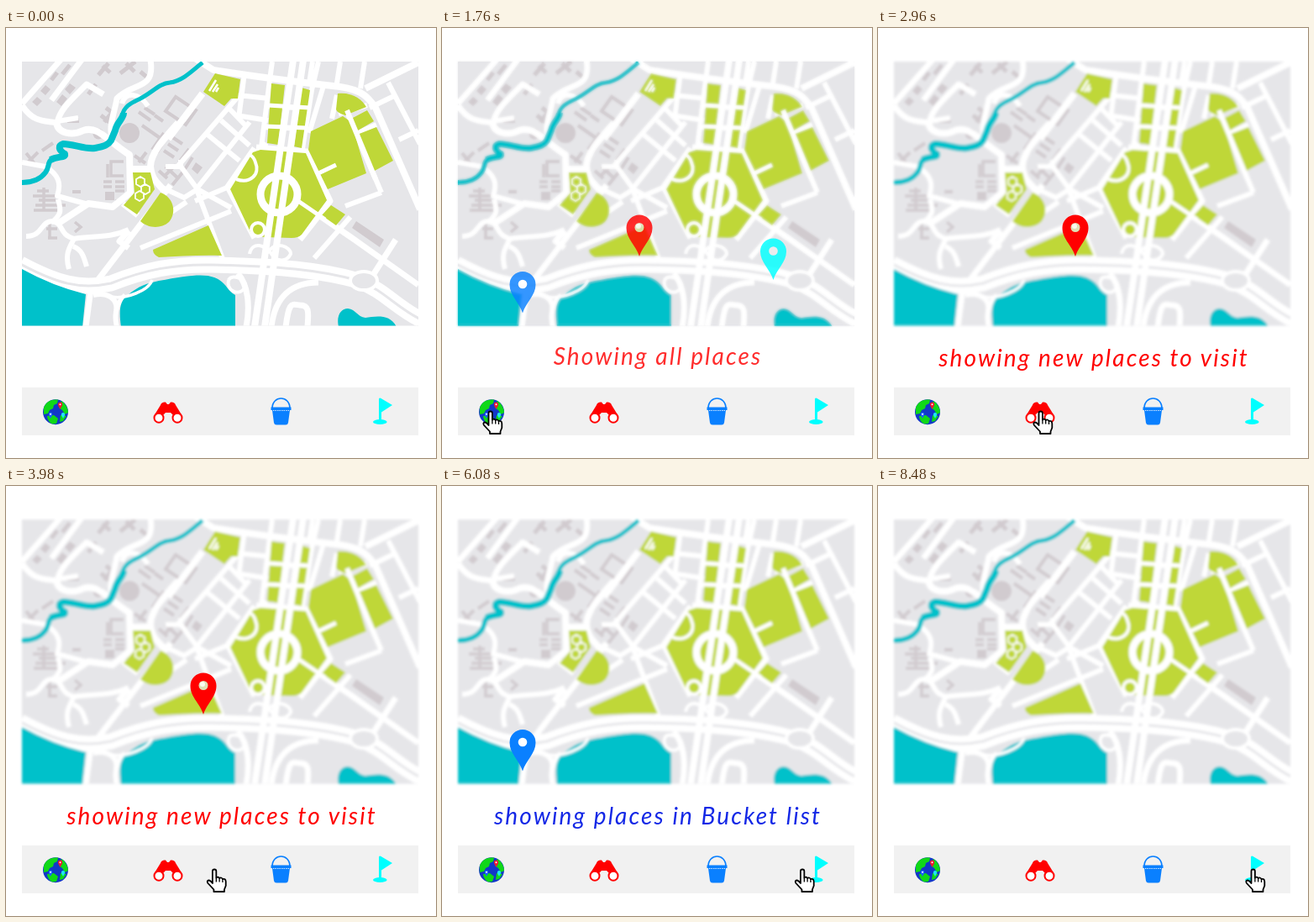
Animation of 512 by 512 pixels, one loop 9.14 s. Source, as an HTML page:

```html
<!DOCTYPE html>
<html lang="en">
<head>
<meta charset="utf-8">
<title>Places map</title>
<style>
  html, body { margin: 0; width: 100%; height: 100%; overflow: hidden; background: #fff; }
  svg { display: block; width: 100vw; height: 100vh; }
  text { font: italic 28px Lato, sans-serif; letter-spacing: 2.1px; text-anchor: middle; }
  .road { fill: none; stroke: #fff; stroke-linejoin: round; }
  .block { fill: none; stroke: #d1cbcf; }
</style>
</head>
<body>
<svg viewBox="0 0 512 512">
  <defs>
    <clipPath id="frame"><path d="M19 40H491V354.500H19z"/></clipPath>
    <filter id="soft" x="-5%" y="-5%" width="110%" height="110%"><feGaussianBlur stdDeviation="1.7"/></filter>
    <path id="pin" d="M0 0C-4-13-15.500-21-15.500-34A15.500 15.500 0 0 1 15.500-34C15.500-21 4-13 0 0z"/>
    <path id="highway" d="M17 281C60 304 88 312 125 304C165 288 200 281 245 282C320 283 376 288 420 301C450 312 466 334 494 347"/>

    <g id="map" clip-path="url(#frame)">
      <path fill="#e6e6e9" d="M19 40H491V356H19z"/>

      <!-- buildings -->
      <g fill="#d1cbcf">
        <circle cx="147" cy="125" r="12"/><circle cx="110" cy="126" r="6.500"/>
        <path d="M73 108h14v5H73zM118 195h11v10h-11zM79 193h10v4H79zM226 160l8 6-6 8-7-6zM417 230l33 22-5 9-33-23z"/>
        <path d="M47 68l6 5-6 7-6-5zM37 82l6 5-6 6-6-5zM76 66l7 5-7 8-6-6zM67 79l6 5-7 9-6-5z"/>
      </g>
      <g class="block">
        <path stroke-width="4" d="M202 82L226 98 214 115 190 99z"/>
        <path stroke-width="5" d="M54 62l7-9M67 55l9-11M110 56l12-14M115 45l9 8M136 54l18-14M143 42l10 10M160 52l7 6M98 79l9-12M117 112l12-15M113 104l10 8M119 95l9 7"/>
        <path stroke-width="4" d="M158 100l14 10M165 95l12 8M177 104l10 7M162 116l20 14M174 145l14-20M180 148l10-16M198 130l12 8M193 138l12 8M188 146l12 8M206 160l12-16M213 168l9-14"/>
        <path stroke-width="4" d="M153 152l13 9M158 160l9-12M24 149l12 15M24 162l14-14M43 146l13-9M190 165l16 15M188 177l14-14M198 187l13-16M182 170l10 9"/>
        <path stroke-width="3.500" d="M140 159h-15v17h15M121 162v16M116 183h10M116 189h10M130 183h11M130 189h11M130 194h11M130 206h11"/>
        <path stroke-width="3.500" d="M37 194h14M32 200h31M39 205h20M35 211h36M33 217h28M45 190v27M48 239h13M52 232v18M50 250h11M82 231l7 6-7 6"/>
      </g>

      <!-- streets -->
      <g class="road">
        <path stroke-width="8" d="M222 34L247 50C290 57 345 64 398 70C424 74 431 82 440 95L493 216M428 72L491 41"/>
        <path stroke-width="6" d="M455 65L493 138M468 133L491 122M433 95L464 80M372 40L364 74 352 150M398 40L393 72M427 40L422 72M365 40L361 66"/>
        <path stroke-width="6" d="M317 40L314 62 304 142M284 53L277 108M276 80L314 84M274 104L312 110M312 93L362 96M308 118L358 120M378 69L361 125"/>
        <path stroke-width="6" d="M394 80L388 108M396 102L430 92M406 100L447 196M412 128L441 115M447 196L404 212M410 225L367 274"/>
        <path stroke-width="7" d="M296 143L264 189 296 250M298 142L358 147 386 206 350 252M345 204L412 250 491 306M464 252L432 302"/>
        <path stroke-width="6" d="M276 82L205 164M290 112L228 190M310 137L268 190M264 94L286 117M256 110L290 140M240 127L278 158M228 192L268 214M268 188L225 206"/>
        <path stroke-width="8" d="M234 78L193 132M205 113C186 134 172 150 172 165C174 185 184 185 190 197M174 168H145"/>
        <path stroke-width="6" d="M190 165h18v-8M186 190L212 202 228 192 206 162M160 262L268 218M228 195L258 275M175 234L215 207"/>
        <path stroke-width="7" d="M95 356L101 311 196 187M146 241L135 254 146 262M157 223L139 209"/>
        <path stroke-width="7" d="M65 38L19 90M172 38C178 75 151 64 132 84C130 98 122 116 126 130M19 92C33 114 48 110 61 113C64 97 77 86 96 67L116 79M90 38L54 86"/>
        <path stroke-width="8" d="M60 110C60 127 80 128 92 122C110 116 120 134 147 151L148 196 127 213 98 209 60 234"/>
        <path stroke-width="6" d="M138 90C142 76 158 76 169 93M61 111L86 107M19 160L47 165C63 175 66 185 61 200L98 210M62 204C66 218 66 222 54 232"/>
        <path stroke-width="6" d="M24 248C45 248 40 230 56 230C70 234 62 245 81 251C101 247 123 251 146 240M81 251C75 262 70 270 75 287M80 260C91 264 93 274 96 284"/>
        <use href="#highway" stroke-width="19"/>
        <use href="#highway" stroke="#e6e6e9" stroke-width="3"/>
        <path stroke-width="6" d="M132 356C127 335 135 325 142 318M104 318C120 314 134 322 131 337"/>
        <path stroke-width="7" d="M286 356C291 330 288 306 276 292M316 356C320 320 340 303 372 303M333 356C337 325 340 329 350 330C362 330 360 340 359 356"/>
        <ellipse cx="426" cy="301" rx="16" ry="11" fill="#e6e6e9" stroke-width="4"/>
      </g>

      <!-- parks -->
      <g fill="#bfd738">
        <path d="M249 54L279 61 276 84H268L260 93 235 76z"/>
        <path d="M316 66L332 68 324 139 311 137zM352 71L362 74 352 143 343 141z"/>
        <path d="M395 78C412 76 424 85 429 94L404 104Q394 101 393 97z"/>
        <path d="M411 108L430 98 438 111 419 122zM418 127L441 118 461 158 437 171z"/>
        <path d="M363 123L401 105 411 112 429 173 383 192 360 145z"/>
        <path d="M303 145L357 149 382 205 352 246Q348 250 340 250L307 249 292 245 267 192 294 148z"/>
        <path d="M387 211L404 222 393 235 376 223z"/>
        <path d="M175 264L241 235 257 271C230 270 205 272 182 273Q175 270 175 264z"/>
        <path d="M151 172H172L177 192 156 222 140 211 153 196z"/>
        <path d="M184 196C199 201 204 219 194 231C184 240 168 238 160 230z"/>
      </g>

      <!-- water -->
      <g fill="#00c1ca">
        <path d="M19 287Q55 307 95 317L91 356H19z"/>
        <path d="M137 356C134 334 136 325 145 318C158 307 168 304 182 301C215 295 235 292 248 297C263 303 262 312 273 318V356z"/>
        <path d="M396 356C393 342 399 334 407 334C417 335 418 344 428 345C440 343 458 340 465 356z"/>
      </g>
      <g fill="none" stroke="#00c1ca" stroke-linejoin="round">
        <path stroke-width="6" d="M19 184C33 184 41 180 47 172C52 166 49 159 55 156"/>
        <path stroke-width="8" d="M53 157C62 152 71 155 70 150C62 145 62 140 68 138C80 138 95 145 106 143C117 141 122 139 125 134L130 122C132 112 140 108 140 101"/>
        <path stroke-width="5" d="M138 105C141 92 150 89 160 84C175 76 183 66 195 65C210 63 222 51 234 41"/>
      </g>

      <!-- roads across parks and water -->
      <g class="road">
        <path stroke-width="8" d="M342 38L296 356M354 38L308 356"/>
        <circle cx="325" cy="198" r="22" stroke-width="9"/>
        <path stroke-width="5" d="M312 92L362 95M308 117L358 119M372 173L393 163M345 204L380 228"/>
        <path stroke-width="6" d="M406 98L440 180"/>
        <path stroke-width="4" d="M274 180C291 186 303 174 297 160Q295 153 290 151M292 240a8 8 0 1 0 16 0a8 8 0 1 0-16 0"/>
        <path stroke-width="4" d="M290 269C293 253 310 259 312 267C321 253 339 260 339 269C334 279 322 280 314 266M265 300C262 312 276 320 284 310C290 301 270 291 265 300"/>
        <path stroke-width="3.500" d="M126 320C142 323 170 313 174 300"/>
        <path stroke-width="1.800" d="M160 177l5 3v6l-5 3-5-3v-6zM166 186l5 3v6l-5 3-5-3v-6zM159 194l5 3v6l-5 3-5-3v-6z"/>
        <path stroke-width="2.500" d="M242 75l8-13M246 76l6-9M250 76l3-5"/>
      </g>
    </g>
  </defs>

  <use id="sharp" href="#map"/>
  <g id="blurred" filter="url(#soft)"><use href="#map"/></g>

  <g id="overlay">
    <g id="bluePin"><use href="#pin" x="96" y="339.500" fill="#0a80ff"/><circle cx="96" cy="305" r="5.300" fill="#fff"/></g>
    <g id="redPin"><use href="#pin" x="235" y="272" fill="#f00"/><circle cx="235" cy="237.500" r="5.500" fill="#dfe0b4"/><circle cx="234" cy="236" r="3" fill="#fbfbef"/></g>
    <g id="cyanPin"><use href="#pin" x="394.500" y="300" fill="#0ff"/><circle cx="394.500" cy="265.500" r="5.300" fill="#ececee"/></g>
    <text id="caption" x="257"></text>
  </g>

  <path fill="#f1f1f1" d="M19 428H491V485H19z"/>

  <!-- globe -->
  <circle cx="59" cy="457.200" r="15" fill="#1238c8"/>
  <path fill="#10d818" d="M45 452C48 444 55 442 62 442.500L61 447 57 449 56 453 52 455 50 459 45 460zM66 444C71 447 74 453 74 458L70 460 67 455 63 452zM49 462L57 461 62 465 60 471 55 471.500C52 470 49 466 49 462zM65 461l7 1-4 6-4 1z"/>
  <g transform="translate(64.500 454)"><use href="#pin" transform="scale(.17)" fill="#f01830"/><circle cy="-5.800" r="1" fill="#fff"/></g>
  <g transform="translate(53 465)"><use href="#pin" transform="scale(.15)" fill="#1a60ff"/><circle cy="-5.200" r="1" fill="#fff"/></g>
  <g transform="translate(68 465)"><use href="#pin" transform="scale(.14)" fill="#20e8f0"/></g>

  <!-- binoculars -->
  <g fill="#f00">
    <path d="M176 462L184 449Q185 445 190 445.500L192 448H194L196 445.500Q201 445 202 449L210 462 199 461 196 458H190L187 461z"/>
    <g fill="#fff" stroke="#f00" stroke-width="2"><circle cx="182" cy="464.200" r="5.500"/><circle cx="204" cy="464.200" r="5.500"/></g>
  </g>

  <!-- bucket -->
  <path fill="none" stroke="#0a80ff" stroke-width="1.700" d="M317 453C317 437 338 437 338 453"/>
  <path fill="#0a80ff" d="M315.500 451.500H339.500V455H338L336 470Q335.500 472.500 333 472.500H322Q319.500 472.500 319 470L317 455H315.500z"/>
  <path stroke="#fff" stroke-width=".8" stroke-dasharray="1.500 1" d="M318 455.500H337"/>

  <!-- flag -->
  <g fill="#0ff"><path d="M444 441.500Q445 440 446.500 441L460 449 447 457.500V468H444z"/><ellipse cx="445.300" cy="469" rx="8.300" ry="3"/></g>

  <g id="cursor" fill="#fff" stroke="#000" stroke-width="1.800" stroke-linejoin="round">
    <path d="M7.500 17.500V3.200a2.200 2.200 0 0 1 4.400 0V11Q14 9 15.700 11.500Q18 10 19.500 12.500Q23 11.500 23.300 15.500V20.500L21.500 25V27.500H9V25L2 17.500Q.3 14.600 2.800 14Q4.700 13.800 7.500 17.500z"/>
    <path fill="none" stroke-width="1.300" d="M11.900 11v5M15.700 11.500v4.500M19.500 12.500v4"/>
  </g>
</svg>
<script>
const LOOP = 9140, CURSOR_Y = 455.5;
const el = id => document.getElementById(id);
const clamp = v => Math.max(0, Math.min(1, v));

const scenes = [
  { from: 1180, text: "Showing all places", fill: "#f00", y: 401, pins: ["redPin", "bluePin", "cyanPin"] },
  { from: 2960, text: "showing new places to visit", fill: "#f00", y: 403, pins: ["redPin"] },
  { from: 4800, text: "showing places in Bucket list", fill: "#1428e6", y: 403, pins: ["bluePin"] },
  { from: 6640, text: "showing visited places", fill: "#0ff", y: 403, pins: ["cyanPin"] },
  { from: 8480, text: "", fill: "#000", y: 403, pins: [] }
];
const moves = [
  { start: 150, x: 48 }, { start: 1970, x: 184 }, { start: 3730, x: 317 }, { start: 5590, x: 437 }
];

// Constant speed with a short ramp at both ends
function glide(t, ramp = 0.1) {
  const speed = 1 / (1 - ramp);
  if (t < ramp) return speed * t * t / (2 * ramp);
  if (t > 1 - ramp) return 1 - speed * (1 - t) ** 2 / (2 * ramp);
  return speed * (t - ramp / 2);
}
const arc = (a, b, c, t) => (1 - t) ** 2 * a + 2 * t * (1 - t) * b + t * t * c;

function drawCursor(now) {
  const i = Math.max(0, moves.findLastIndex(m => now >= m.start));
  const { start, x: goal } = moves[i];
  const p = glide(clamp((now - start) / 600));
  const x = i ? moves[i - 1].x + (goal - moves[i - 1].x) * p : arc(-26, 87, goal, p);
  const y = i ? CURSOR_Y : arc(283, 345, CURSOR_Y, p);
  const press = 1 - 0.2 * Math.sin(Math.PI * clamp((now - start - 680) / 270));
  el("cursor").setAttribute("transform",
    `translate(${x + 12} ${y + 14}) scale(${press}) translate(-12 -14)`);
}

function draw(now) {
  const fade = clamp((now - 1180) / 700);
  el("sharp").style.opacity = fade < 1 ? 1 : 0;
  el("blurred").style.opacity = el("overlay").style.opacity = fade;

  const scene = scenes.findLast(s => now >= s.from) || scenes[0];
  const caption = el("caption");
  caption.textContent = scene.text;
  caption.setAttribute("fill", scene.fill);
  caption.setAttribute("y", scene.y);
  for (const pin of scenes[0].pins)
    el(pin).style.display = scene.pins.includes(pin) ? "" : "none";
  drawCursor(now);
}

const begin = performance.now();
function tick() {
  draw((performance.now() - begin) % LOOP);
  requestAnimationFrame(tick);
}
tick();
</script>
</body>
</html>
```
